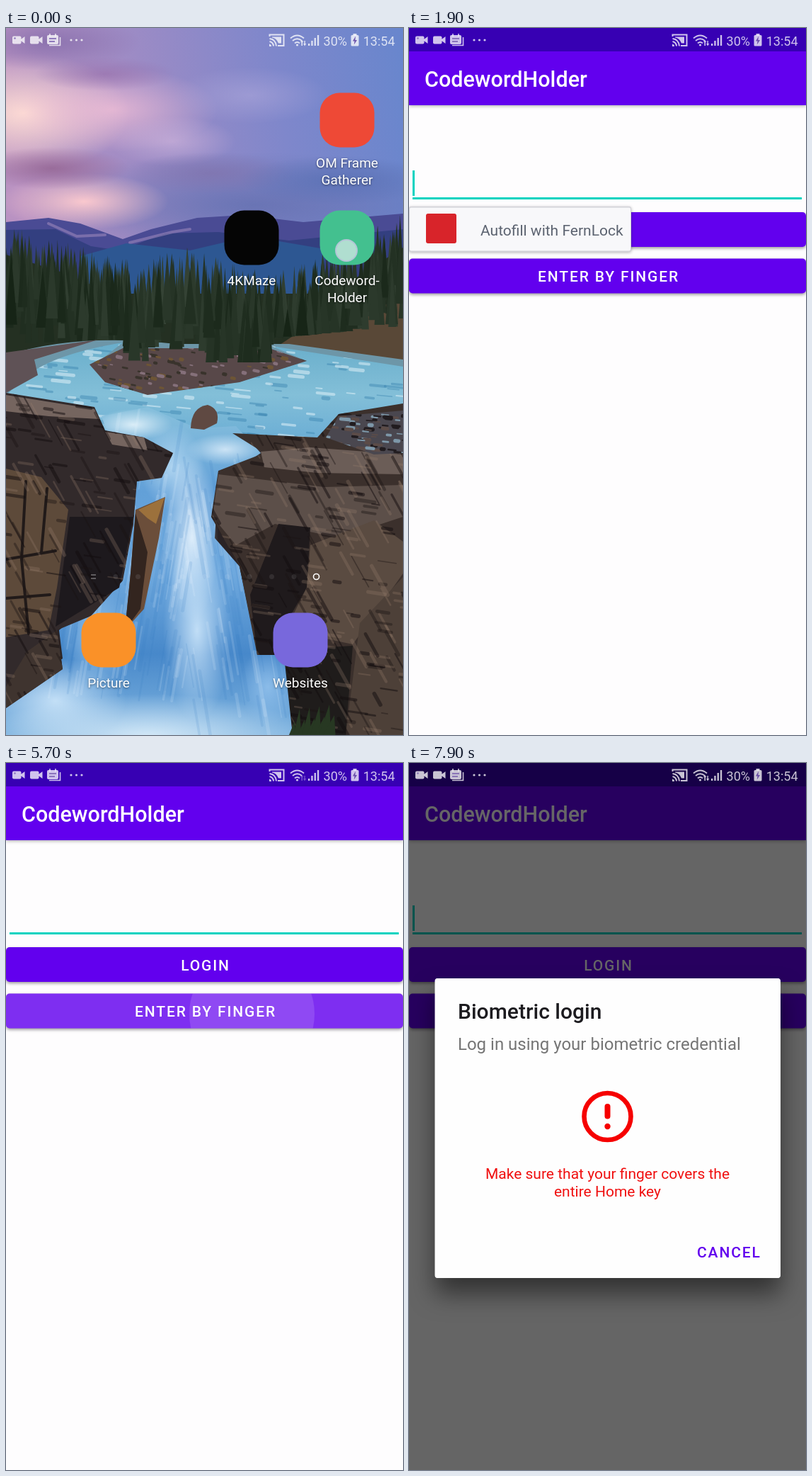
An HTML page with a canvas for the animation above (8000 ms loop, 561 px wide and 998 px high).

```html
<!DOCTYPE html>
<html lang="en">
<head>
<meta charset="utf-8">
<title>Login demo</title>
<style>
html, body { margin: 0; width: 100%; height: 100%; overflow: hidden; background: #fff; }
canvas { display: block; width: 561px; height: 998px; }
</style>
</head>
<body>
<canvas id="stage" width="561" height="998"></canvas>
<script>
const W = 561, H = 998, LOOP = 8000, STEP = 100;
const PIVOT = { x: 482, y: 325 };
const PURPLE = '#6200ee', DARK = '#3700b3', TEAL = '#03d3c0';
const screen2d = document.getElementById('stage').getContext('2d');
let ctx = screen2d;

const clamp = v => Math.max(0, Math.min(1, v));
const ramp = (t, a, b) => clamp((t - a) / (b - a));

function shape(color, d) {
  ctx.fillStyle = color;
  ctx.fill(new Path2D(d));
}

function line(color, width, d) {
  ctx.strokeStyle = color;
  ctx.lineWidth = width;
  ctx.stroke(new Path2D(d));
}

function box(x, y, w, h, r, color) {
  ctx.fillStyle = color;
  ctx.beginPath();
  ctx.roundRect(x, y, w, h, r);
  ctx.fill();
}

function disc(x, y, r, color) {
  ctx.fillStyle = color;
  ctx.beginPath();
  ctx.arc(x, y, r, 0, 7);
  ctx.fill();
}

function ring(x, y, r, width, color) {
  ctx.strokeStyle = color;
  ctx.lineWidth = width;
  ctx.beginPath();
  ctx.arc(x, y, r, 0, 7);
  ctx.stroke();
}

function text(str, x, y, size, color, { style = '', align = 'left', gap = 0 } = {}) {
  ctx.font = `${style} ${size}px Roboto, sans-serif`;
  ctx.letterSpacing = gap + 'px';
  ctx.textAlign = align;
  ctx.fillStyle = color;
  ctx.fillText(str, x, y);
}

function withShadow(color, blur, dy, draw) {
  ctx.save();
  ctx.shadowColor = color;
  ctx.shadowBlur = blur;
  ctx.shadowOffsetY = dy;
  draw();
  ctx.restore();
}

function layer(alpha, draw) {
  if (alpha <= 0) return;
  ctx.save();
  ctx.globalAlpha *= clamp(alpha);
  draw();
  ctx.restore();
}

function zoom(s) {
  ctx.translate(PIVOT.x, PIVOT.y);
  ctx.scale(s, s);
  ctx.translate(-PIVOT.x, -PIVOT.y);
}

function random(seed) {
  return () => (seed = (seed * 16807) % 2147483647) / 2147483647;
}

function glow(x, y, rx, ry, rgb, alpha) {
  ctx.save();
  ctx.translate(x, y);
  ctx.scale(rx, ry);
  const g = ctx.createRadialGradient(0, 0, 0, 0, 0, 1);
  g.addColorStop(0, `rgba(${rgb},${alpha})`);
  g.addColorStop(1, `rgba(${rgb},0)`);
  ctx.fillStyle = g;
  ctx.fillRect(-1, -1, 2, 2);
  ctx.restore();
}

function gradient(x0, y0, x1, y1, ...colors) {
  const g = ctx.createLinearGradient(x0, y0, x1, y1);
  colors.forEach((c, i) => g.addColorStop(i / (colors.length - 1), c));
  return g;
}

// Conifers in rows, the far ones paler
function trees(rnd, n, x0, x1, top, base) {
  for (let i = 0; i < n; i++) {
    const near = i / n, k = rnd(), x = x0 + (x1 - x0) * k;
    const y = top(k) + near * 70 * rnd() + rnd() * 15;
    const b = Math.min(base(k), y + 75 + rnd() * 40), w = 4 + rnd() * 6;
    const tone = 22 + rnd() * 22 + (1 - near) * 12;
    shape(`rgb(${tone},${tone + 14},${tone})`, `M${x} ${y}L${x + w} ${b}H${x - w}Z`);
  }
}

// Streaks scattered inside an outline
function grain(rnd, d, n, [x, y, w, h], colors, len, slope) {
  ctx.save();
  ctx.clip(new Path2D(d));
  for (let i = 0; i < n; i++) {
    const px = x + rnd() * w, py = y + rnd() * h, l = len * (0.4 + rnd());
    line(colors[i % colors.length], 1.5 + rnd() * 4, `M${px} ${py}l${l} ${l * slope(px, rnd())}`);
  }
  ctx.restore();
}

function paintSky() {
  box(0, 0, W, 330, 0, gradient(0, 90, W, 0, '#b992c2', '#9c8bc5', '#7f87cb', '#6886cd'));
  glow(350, 250, 330, 75, '102,114,178', 0.9);
  glow(25, 120, 150, 85, '253,220,212', 1);
  glow(150, 115, 150, 60, '240,190,214', 0.8);
  glow(110, 245, 120, 40, '250,200,206', 1);
  glow(235, 160, 90, 35, '205,178,218', 0.7);
  glow(345, 95, 110, 40, '172,166,218', 0.6);
  glow(65, 198, 110, 30, '150,104,150', 0.9);
  glow(60, 20, 130, 40, '132,108,170', 0.8);
  glow(140, 65, 100, 24, '150,112,172', 0.7);
  glow(290, 205, 120, 30, '128,116,174', 0.8);
  glow(470, 215, 140, 35, '88,112,180', 0.8);
}

function paintForest(rnd) {
  shape('#4a4b94', 'M0 274L60 268 105 276 165 298 205 284 270 268 335 264 420 274 561 262V400H0Z');
  shape('#333f80', 'M0 285L70 284 120 308 160 314 225 290 300 288 400 300 561 284V400H0Z');
  line('rgba(170,145,195,.5)', 4, 'M60 276L100 294 140 292M175 303L235 288 260 284');
  shape('#2d5792', 'M105 322L170 304 260 314 345 294 450 312V400H105Z');
  shape('#243022', 'M0 320L80 345 172 385V462H0ZM165 375H460L561 310V462H165Z');
  shape('#594837', 'M375 455L440 412 561 385V470Z');
  trees(rnd, 150, -5, 172, k => 274 + k * 50, k => 446 - k * 6);
  trees(rnd, 110, 375, 566, k => 345 - k * 85, k => 438 - k * 18);
}

function paintRiver(rnd) {
  shape('#6d96a8', 'M0 462Q100 430 240 446H400L561 468V590H0Z');
  const river = 'M20 500Q55 462 165 444L122 478 200 515 330 500 420 468 375 449 561 478V545L430 592H190Q70 540 0 518Z';
  shape(gradient(0, 445, 0, 590, '#69aecb', '#83bfd8', '#68abd4'), river);
  grain(rnd, river, 220, [0, 445, 561, 145], ['rgba(232,246,252,.5)', 'rgba(50,125,170,.4)'], 18, () => 0.1);
  shape('#5f5256', 'M0 458L130 440 40 468 45 490 0 515Z');
  const island = 'M118 475L165 452H372L425 470 330 500 200 518 140 500Z';
  shape('#584849', island);
  grain(rnd, island, 130, [118, 450, 305, 68], ['#85707a', '#39332c', '#6d5535'], 5, () => 0.2);
  trees(rnd, 110, 170, 372, k => 306 + Math.abs(k - 0.4) * 55, () => 472);
}

function paintFall(rnd) {
  const fall = 'M135 548L200 535 270 565 325 562 360 600 300 640 295 720 330 760 355 880 390 870 415 998H0V950L80 890 75 850 160 780 180 660 150 590Z';
  shape(gradient(0, 540, 0, 998, '#86bfdc', '#62a0d8', '#6fa9de', '#4788ca', '#7fb4e0'), fall);
  glow(180, 560, 55, 22, '240,250,255', 0.8);
  glow(310, 595, 55, 22, '225,240,252', 0.8);
  glow(235, 620, 45, 60, '190,222,246', 0.8);
  glow(262, 720, 38, 120, '226,240,252', 0.95);
  glow(270, 850, 48, 130, '205,230,250', 0.9);
  glow(130, 860, 50, 70, '165,208,242', 0.8);
  glow(70, 950, 100, 60, '205,230,250', 0.9);
  glow(200, 1000, 230, 60, '220,238,250', 0.9);
  glow(370, 930, 40, 55, '150,196,238', 0.8);
  grain(rnd, fall, 220, [60, 600, 330, 350], ['rgba(240,249,255,.14)', 'rgba(50,120,190,.14)'], 11,
    x => (x < 250 ? -6 : 6));
}

function paintRocks(rnd) {
  const left = 'M0 515L125 535 140 568 195 578 236 600 220 635 185 640 180 700 165 780 120 830 72 850 80 905 0 960Z';
  const right = 'M320 572L440 578 470 545 561 530V998H405L395 880 355 885 330 760 290 690 300 625 365 600Z';
  shape('#322a2b', left);
  shape('#3b302c', right);
  shape('#75655f', 'M0 518L125 538 132 552 60 548 0 541ZM140 570L195 578 200 596 150 588Z');
  shape('#5d4a3a', 'M0 622L50 634 88 680 72 790 60 850 0 860Z');
  line('#211a19', 4, 'M28 640L22 750 32 855M58 650L50 740M0 750L70 738M0 805L62 800');
  shape('#1d191d', 'M90 690L180 690 160 790 70 845Z');
  shape('#3f342f', 'M30 880L72 850 80 905 0 960V930Z');
  shape('#6b5d57', 'M360 598L430 592 561 602V630L440 628 365 620Z');
  shape('#5c4f49', 'M300 630L450 648 561 645V690L470 720 380 700 325 730 292 690Z');
  shape('#1f1a1c', 'M385 700L430 705 425 790 390 850 395 885 355 885 345 800Z');
  shape('#5a4b41', 'M430 730L520 695 561 725V770L490 870 395 850 425 790Z');
  shape('#4d4038', 'M561 775L500 840 480 998H561Z');
  shape('#1f1c1b', 'M392 878L490 872 480 998H405Z');
  const marks = ['rgba(18,12,14,.5)', 'rgba(150,126,108,.28)', 'rgba(25,18,18,.4)'];
  const slope = (x, r) => (r < 0.55 ? 0.15 : 1.8);
  grain(rnd, left, 260, [-20, 515, 260, 440], marks, 20, slope);
  grain(rnd, right, 320, [280, 530, 280, 468], marks, 20, slope);
  shape('#6b4e3a', 'M183 680L225 662 216 720 195 820 168 850 176 770Z');
  shape('#9c713c', 'M187 680L224 663 212 700 200 692Z');
  shape('#33251f', 'M183 685L200 740 190 820 168 850 176 770Z');
  shape('#5f4942', 'M261 565Q262 535 285 532 303 538 298 558L280 567Z');
  const shore = 'M452 578L470 548 561 540V600L520 602Z';
  shape('#4a474f', shore);
  grain(rnd, shore, 70, [450, 540, 111, 60], ['#211c1f', '#7d97a8', '#5c4c48'], 8, () => 0.1);
  for (let i = 0; i < 9; i++) shape('#273822', `M${400 + i * 6} 998l${8 + i} ${-20 - (i * 17) % 32}l3 55Z`);
}

function buildScenery() {
  const c = document.createElement('canvas');
  const rnd = random(77);
  c.width = W;
  c.height = H;
  ctx = c.getContext('2d');
  ctx.lineCap = 'round';
  box(0, 500, W, H, 0, '#2a2325');
  paintSky();
  paintForest(rnd);
  paintRiver(rnd);
  paintFall(rnd);
  paintRocks(rnd);
  ctx = screen2d;
  return c;
}

const APPS = [
  [482, 130, '#ee4936', ['OM Frame', 'Gatherer']],
  [347, 296, '#050505', ['4KMaze']],
  [482, 296, '#43c08f', ['Codeword-', 'Holder']],
  [145, 864, '#fa9128', ['Picture']],
  [416, 864, '#7868dc', ['Websites']]
];

function drawApps() {
  for (const [x, y, color, names] of APPS) {
    box(x - 38.5, y - 38.5, 77, 77, 28, color);
    withShadow('rgba(0,0,0,.5)', 3, 1, () => names.forEach((name, i) =>
      text(name, x, y + 66.5 + i * 24.5, 19, '#fff', { align: 'center' })));
  }
  line('rgba(255,255,255,.4)', 1.5, 'M120 772H127M120 777H127');
  for (let x = 155; x < 420; x += 31.5) disc(x, 774.5, 3.5, 'rgba(255,255,255,.09)');
  ring(438.5, 774.5, 4, 1.6, '#fff');
}

function drawHome(t) {
  ctx.drawImage(scenery, 0, 0);
  const k = t / 200;
  if (t > 0) layer((t / 410) ** 2, () => {
    zoom(1 - 0.189 * Math.exp((200 - t) / 85));
    box(0, 0, W, H, 0, '#fff');
    box(0, 0, W, 33, 0, DARK);
  });
  layer(1 - 0.23 * k ** 3, () => {
    zoom(1 + 0.31 * k ** 1.5);
    drawApps();
  });
  if (t === 0) touch(481, 314, 0.85);
}

function touch(x, y, alpha) {
  layer(alpha, () => {
    disc(x, y, 14.5, 'rgba(240,240,245,.75)');
    ring(x, y, 15, 2, '#c4c4e0');
  });
}

function button(y, label) {
  withShadow('rgba(0,0,0,.4)', 4, 2, () => box(0, y, W, 49, 5, PURPLE));
  return () => text(label, 282, y + 32.5, 21, '#fff', { style: '500', align: 'center', gap: 1.875 });
}

function caretOn(t) {
  return t >= 5800 || (t >= 600 && t < 5200 && (t - 600) % 1000 < 500);
}

function drawPopup() {
  withShadow('rgba(0,0,0,.3)', 4, 1, () => box(0, 252, 314, 64, 3, '#d2d2d8'));
  box(1, 253.5, 312, 61, 2, '#f8f8fa');
  box(24, 262, 43, 42, 3, '#d8242a');
  text('Autofill with FernLock', 101, 293, 21, '#5c6370');
}

function drawApp(t) {
  box(0, 0, W, H, 0, '#fefdfe');
  box(0, 0, W, 33, 0, DARK);
  layer(t < 600 ? 0.6 : 0.91 + 0.09 * ramp(t, 700, 1000), () => {
    withShadow('rgba(0,0,0,.35)', 5, 1, () => box(0, 33, W, 76, 0, PURPLE));
    text('CodewordHolder', 22, 82.5, 30.5, '#fff', { style: '500' });
    box(5, 239, 550, 3, 0, TEAL);
    if (caretOn(t)) box(5, 201, 3, 36, 0, TEAL);
    const login = button(260, 'LOGIN');
    const finger = button(325.5, 'ENTER BY FINGER');
    if (t >= 5500 && t < 5900) drawRipple(t);
    login();
    finger();
  });
  box(0, 0, W, 33, 0, DARK);
  layer(ramp(t, 900, 1100) - ramp(t, 3600, 3800), drawPopup);
  layer(ramp(t, 3300, 3500) - ramp(t, 3600, 3800), () => touch(456.5, 517, 1));
  layer(ramp(t, 5200, 5400) - ramp(t, 5500, 5700), () => touch(348, 353, 1));
}

function drawRipple(t) {
  layer(1 - ramp(t, 5700, 5900), () => {
    ctx.beginPath();
    ctx.roundRect(0, 325.5, W, 49, 5);
    ctx.clip();
    box(0, 325, W, 50, 0, 'rgba(255,255,255,.18)');
    disc(347.5, 354, (t - 5450) * 0.354, 'rgba(255,255,255,.13)');
  });
}

const RIDGES = new Path2D(
  'M6.2 3.97C8 3 10 2.5 12 2.5C14 2.5 15.7 2.95 17.8 3.97' +
  'M3.5 9.2C5.6 6.3 8.5 5 12 5C15.5 5 18.4 6.3 20.5 9.2' +
  'M9.75 21.3C8.2 19.7 6.84 18 6.84 14.6C6.84 11.9 9.1 9.7 12 9.7C14.9 9.7 17.16 11.9 17.16 14.6' +
  'M11.94 14.66C11.94 17.5 14 19.45 16.9 19.45C17.3 19.45 17.7 19.4 18.1 19.35' +
  'M14.9 21.5C11.5 20.7 9.4 18 9.4 14.6C9.4 13.2 10.6 12.2 12 12.2C13.4 12.2 14.6 13.3 14.6 14.6' +
  'C14.6 16 15.8 17.1 17.2 17.1C18.6 17.1 19.7 16 19.7 14.6C19.7 10.4 16.3 7.2 12 7.2' +
  'C9 7.2 6.2 8.8 5 11.4C4 13.5 4.2 16 5 18.4');

function drawPrint(y) {
  ctx.translate(280.3, y);
  ctx.scale(3.56, 3.62);
  ctx.translate(-12, -12);
  ctx.strokeStyle = '#08d8c4';
  ctx.lineWidth = 1.12;
  ctx.lineCap = 'round';
  ctx.stroke(RIDGES);
}

function drawAlert(y, grow) {
  ring(280.5, y, 33, 6.6, '#f60000');
  ctx.translate(280.5, y);
  ctx.scale(grow, grow);
  box(-4, -18, 8, 21.5, 4, '#f60000');
  disc(0, 14, 4.2, '#f60000');
}

function drawDialog(t) {
  const e = ramp(t, 7300, 7500);
  const y = 316.5 - 12.5 * e, h = 398 + 25 * e;
  const center = { align: 'center' };
  withShadow('rgba(0,0,0,.5)', 34, 22, () => box(37, y, 488, h, 4, '#fff'));
  box(36.5, y, 488, h, 4, '#fefefe');
  text('Biometric login', 69, y + 56.5, 30, '#1c1b1f', { style: '500' });
  text('Log in using your biometric credential', 69, y + 101, 24, '#757575');
  layer(1 - e, () => {
    text('Touch the fingerprint sensor', 281, y + 283, 21, '#757575', center);
    drawPrint(y + 194.5);
  });
  layer(e, () => {
    text('Make sure that your finger covers the', 280.5, y + 283, 21, '#f01010', center);
    text('entire Home key', 280.5, y + 307.5, 21, '#f01010', center);
    drawAlert(y + 195, 0.3 + 0.7 * ramp(t, 7300, 7700));
  });
  text('CANCEL', 407, y + h - 29.5, 21, PURPLE, { style: '500', gap: 1.875 });
}

function drawStatus(t) {
  const c = '#fff';
  layer(0.77, () => {
    ctx.lineCap = 'butt';
    for (const x of [9, 34]) {
      box(x, 11.5, 12.5, 11, 2, c);
      shape(c, `M${x + 12} 16l5.5 -4v10l-5.5 -4Z`);
    }
    disc(12.5, 14.5, 1.3, '#765cae');
    box(58, 10, 16, 13, 2, c);
    line(c, 1.6, 'M62 8V12M70 8V12M61 24.5H76.5V13');
    line('#765cae', 1.8, 'M61 15H71M61 19H69');
    for (const x of [92, 99.5, 107]) disc(x, 17, 1.6, c);

    line(c, 2, 'M372.5 12V9.5H392.5V25H384M372.5 15Q381 16 382 25.5M372.5 19Q377.5 20 378 25.5');
    shape(c, 'M376 12.5H389V21.5H385Q382 14 376 13.5ZM372 22.5Q375 23 375 26H372Z');
    line(c, 1.9, 'M402 14.5Q411.5 6.5 421 14.5M405 18Q411.5 12.5 418 18M408 21.5Q411.5 18.5 415 21.5');
    disc(411.5, 24, 1.6, c);
    layer(t >= 3700 && t < 6100 ? 0.4 : 1, () =>
      shape(c, 'M416 20l2.2 -3 2.2 3h-1.4v5h-1.6v-5ZM420 22h1.4v-4h1.4v4h1.4l-2.1 3.5Z'));
    for (let i = 0; i < 4; i++) box(427 + i * 4.3, 22 - i * 4, 2.3, 3 + i * 4, 0, c);
    text('30%', 482, 24.5, 18, c, { align: 'right' });
    box(487.5, 10, 11, 15.5, 1.5, c);
    box(490.5, 8, 5, 3, 0, c);
    shape('#4b2a98', 'M494 11.5l-4 7h2.5l-.7 5 4.2 -6.5h-2.6Z');
    text('13:54', 549.5, 24.5, 18, c, { align: 'right' });
  });
}

const scenery = buildScenery();

function draw(t) {
  ctx.clearRect(0, 0, W, H);
  if (t < 500) {
    drawHome(t);
  } else {
    drawApp(t);
    layer(ramp(t, 5700, 5900), () => {
      box(0, 0, W, H, 0, 'rgba(0,0,0,.6)');
      drawDialog(t);
    });
  }
  drawStatus(t);
}

const start = performance.now();
function tick() {
  const t = (performance.now() - start) % LOOP;
  draw(Math.floor(t / STEP) * STEP);
  requestAnimationFrame(tick);
}
tick();
</script>
</body>
</html>
```
